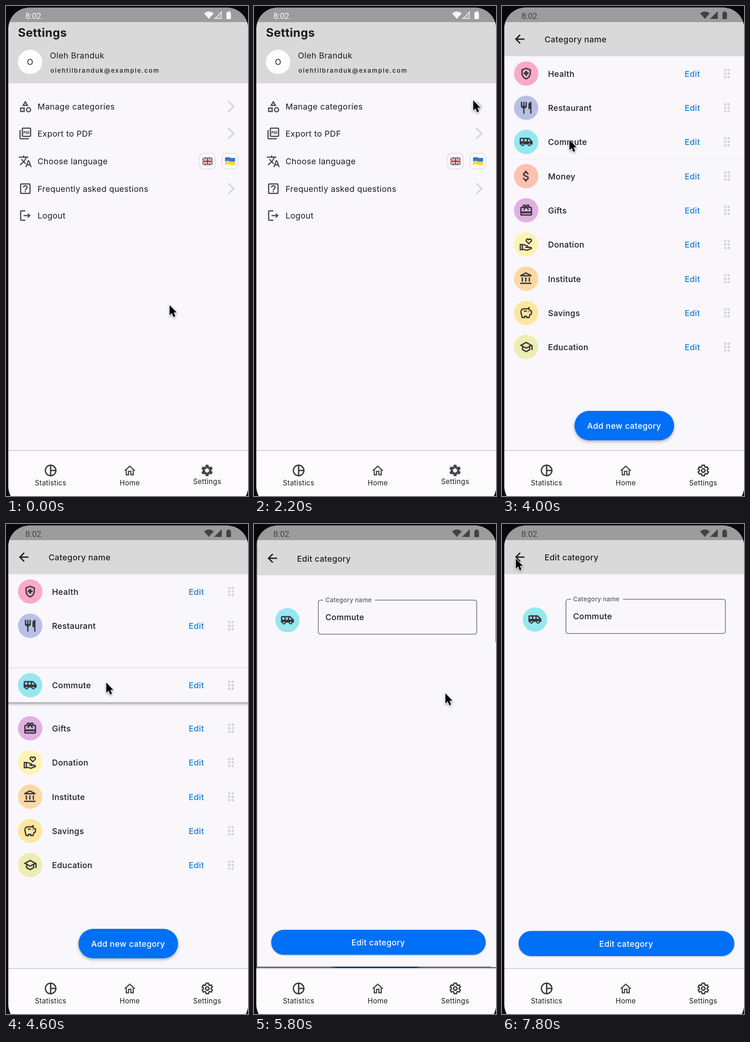
Animation of 526 by 1065 pixels, one loop 8000 ms. Source, as an HTML page:

```html
<!DOCTYPE html>
<html lang="en">
<head>
<meta charset="utf-8">
<title>Categories</title>
<style>
html, body { margin: 0; width: 526px; height: 1065px; overflow: hidden; background: #09070b; }
svg { display: block; }
text { font-family: Inter, sans-serif; font-size: 17.8px; letter-spacing: .38px; fill: #1c1b1f; }
.m { font-weight: 500; letter-spacing: .33px; }
.mid { text-anchor: middle; }
.title { font-size: 25.5px; font-weight: 700; letter-spacing: .35px; }
.mail { font-size: 13.3px; font-weight: 500; letter-spacing: 1.85px; }
.tab { font-size: 15.2px; letter-spacing: .3px; }
.label { font-size: 13.3px; font-weight: 500; letter-spacing: .28px; fill: #5c5a60; }
.clock { font-family: Roboto, sans-serif; font-size: 18px; letter-spacing: 0; fill: currentColor; }
.link { fill: #0f7fdf; }
.white { fill: #fff; }
.icon { fill: #49474c; fill-rule: evenodd; }
.dark { fill: #38363b; stroke: #38363b; stroke-width: .25; }
.back { fill: #1c1b1f; stroke: #1c1b1f; stroke-width: .2; }
.line { fill: none; stroke: #38363b; stroke-width: 2.1; }
.gear { fill: none; stroke: #38363b; stroke-width: 2.1; }
.chevron { fill: none; stroke: #d6d5d8; stroke-width: 3.4; }
.dots { fill: #d5d3d6; }
.button { fill: #0070f7; filter: drop-shadow(0 3px 3px rgba(0,0,0,.3)); }
.flat { filter: drop-shadow(0 1.5px 1.5px rgba(0,0,0,.3)); }
.pointer { stroke: #fff; stroke-width: 2.2; paint-order: stroke; filter: drop-shadow(0 2px 2px rgba(0,0,0,.35)); }

g, rect { transform-origin: 266px 484px; }
.cursor, .drag, .yield { transform-origin: 0 0; }
svg * { animation-duration: 8s; animation-iteration-count: infinite; animation-timing-function: linear; }

.cursor { animation-name: cursor; animation-timing-function: ease-in-out; }
@keyframes cursor {
  0% { transform: translate(355.5px, 650px); }
  15%, 35% { transform: translate(476.5px, 205px); }
  42.5%, 50% { transform: translate(146.5px, 291px); }
  62.5%, 63% { transform: translate(253px, 371px); }
  67.5%, 87.5% { transform: translate(416px, 368px); }
  97.5%, 100% { transform: translate(30px, 75px); }
}
.list-in { animation-name: list-in; }
@keyframes list-in {
  0%, 28.3% { opacity: 0; transform: scale(.87); }
  29% { opacity: 1; transform: scale(.94); }
  30.1% { transform: scale(.994); }
  31.9%, 100% { opacity: 1; transform: none; }
}
.edit-in { animation-name: edit-in; }
@keyframes edit-in {
  0%, 70.7% { opacity: 0; transform: scale(.87); }
  71.4% { opacity: 1; transform: scale(.94); }
  72.5% { transform: scale(.994); }
  74.2%, 100% { opacity: 1; transform: none; }
}
.settings-out { animation-name: settings-out; }
@keyframes settings-out {
  0%, 28.1% { transform: none; }
  30.1% { transform: scale(1.046); }
  31.9%, 100% { transform: scale(1.05); }
}
.list-out { animation-name: list-out; }
@keyframes list-out {
  0%, 70.5% { transform: none; }
  72.5% { transform: scale(1.046); }
  74.2%, 100% { transform: scale(1.05); }
}
.scrim-a { animation-name: scrim-a; }
@keyframes scrim-a { 0%, 28.1% { opacity: 0; } 30%, 100% { opacity: .6; } }
.scrim-b { animation-name: scrim-b; }
@keyframes scrim-b { 0%, 70.5% { opacity: 0; } 72.4%, 100% { opacity: .6; } }

.tab-on { animation-name: tab-on; }
@keyframes tab-on { 0%, 28.4% { opacity: 1; } 28.41%, 100% { opacity: 0; } }
.tab-off { animation-name: tab-off; }
@keyframes tab-off { 0%, 28.4% { opacity: 0; } 28.41%, 100% { opacity: 1; } }
.status { animation-name: status; fill: currentColor; }
@keyframes status { 0%, 37.4% { color: #f8f7f8; } 37.45%, 100% { color: #424144; } }
.signal { stroke: currentColor; stroke-width: 1.5; animation-name: signal; }
@keyframes signal { 0%, 37.4% { fill-opacity: .2; } 37.45%, 100% { fill-opacity: 1; } }

.drag { animation-name: drag; animation-timing-function: ease-in-out; }
@keyframes drag {
  0%, 50% { transform: none; }
  62.5% { transform: translateY(82px); }
  65.5%, 100% { transform: translateY(74.3px); }
}
.yield { animation-name: yield; animation-timing-function: ease-in-out; }
@keyframes yield {
  0%, 56.5% { transform: none; }
  59.5%, 100% { transform: translateY(-74.3px); }
}
.lift { animation-name: lift; }
@keyframes lift {
  0%, 49.9% { filter: drop-shadow(0 0 0 rgba(0,0,0,0)) drop-shadow(0 0 0 rgba(0,0,0,0)); }
  50% { filter: drop-shadow(0 .5px .5px rgba(0,0,0,.2)) drop-shadow(0 0 0 rgba(0,0,0,0)); }
  53%, 62.5% { filter: drop-shadow(0 .5px 1px rgba(0,0,0,.15)) drop-shadow(0 3px 3px rgba(0,0,0,.4)); }
  65.5%, 100% { filter: drop-shadow(0 0 0 rgba(0,0,0,0)) drop-shadow(0 0 0 rgba(0,0,0,0)); }
}
</style>
</head>
<body>
<svg id="stage" width="526" height="1065" viewBox="0 0 526 1065"></svg>
<script>
const ROW = 74.3, TOP = 109.7, BG = '#f9f7fb', HEAD = '#dad9da';

const icons = {
  shapes: 'M12 2l-5.5 9h11L12 2zm0 3.84L13.93 9h-3.87L12 5.84zM17.5 13a4.5 4.5 0 1 0 0 9 4.5 4.5 0 1 0 0-9zm0 2a2.5 2.5 0 1 1 0 5 2.5 2.5 0 1 1 0-5zM3 21.5h8v-8H3v8zm2-6h4v4H5v-4z',
  pdf: 'M20 2H8c-1.1 0-2 .9-2 2v12c0 1.1.9 2 2 2h12c1.1 0 2-.9 2-2V4c0-1.1-.9-2-2-2zm0 14H8V4h12v12zM4 6H2v14c0 1.1.9 2 2 2h14v-2H4V6zm12 6V9c0-.55-.45-1-1-1h-2v5h2c.55 0 1-.45 1-1zm-2-3h1v3h-1V9zm4 2h1v-1h-1V9h1V8h-2v5h1zm-8 0h1c.55 0 1-.45 1-1V9c0-.55-.45-1-1-1H9v5h1v-2zm0-2h1v1h-1V9z',
  translate: 'M12.87 15.07l-2.54-2.51.03-.03c1.74-1.94 2.98-4.17 3.71-6.53H17V4h-7V2H8v2H1v1.99h11.17C11.5 7.92 10.44 9.75 9 11.35 8.07 10.32 7.3 9.19 6.69 8h-2c.73 1.63 1.73 3.17 2.98 4.56l-5.09 5.02L4 19l5-5 3.11 3.11.76-2.04zM18.5 10h-2L12 22h2l1.12-3h4.75L21 22h2l-4.5-12zm-2.62 7l1.62-4.33L19.12 17h-3.24z',
  help: 'M5 3h14q2 0 2 2v14q0 2-2 2H5q-2 0-2-2V5q0-2 2-2zM5 5v14h14V5zM11 18h2v-2h-2v2zm1-12c-2.21 0-4 1.79-4 4h2c0-1.1.9-2 2-2s2 .9 2 2c0 2-3 1.75-3 5h2c0-2.25 3-2.5 3-5 0-2.21-1.79-4-4-4z',
  logout: 'M17 8l-1.41 1.41L17.17 11H9v2h8.17l-1.58 1.58L17 16l4-4-4-4zM5 5h7V3H5c-1.1 0-2 .9-2 2v14c0 1.1.9 2 2 2h7v-2H5V5z',
  pie: 'M12 2a10 10 0 1 0 0 20 10 10 0 1 0 0-20zm1 2.07c3.61.45 6.48 3.32 6.93 6.93H13V4.07zM4 12c0-4.06 3.07-7.44 7-7.93v15.87c-3.93-.5-7-3.88-7-7.94zm9 7.93V13h6.93c-.45 3.61-3.32 6.48-6.93 6.93z',
  home: 'M12 5.69l5 4.5V18h-2v-6H9v6H7v-7.81l5-4.5M12 3L2 12h3v8h6v-6h2v6h6v-8h3L12 3z',
  back: 'M20 11H7.83l5.59-5.59L12 4l-8 8 8 8 1.41-1.41L7.83 13H20v-2z',
  shield: 'M10.5 13H8v-3h2.5V7.5h3V10H16v3h-2.5v2.5h-3V13zM12 2L4 5v6.09c0 5.05 3.41 9.76 8 10.91 4.59-1.15 8-5.86 8-10.91V5l-8-3zm6 9.09c0 4-2.55 7.7-6 8.83-3.45-1.13-6-4.82-6-8.83v-4.7l6-2.25 6 2.25v4.7z',
  fork: 'M16 6v8h3v8h2V2c-2.76 0-5 2.24-5 4zm-5 3H9V2H7v7H5V2H3v7c0 2.21 1.79 4 4 4v9h2v-9c2.21 0 4-1.79 4-4V2h-2v7z',
  bus: 'M17 5H3c-1.1 0-2 .89-2 2v9h2a3 3 0 0 0 6 0h5.5a3 3 0 0 0 6 0H23v-5l-6-6zM3 11V7h4v4H3zm3 6.5a1.5 1.5 0 1 1 0-3 1.5 1.5 0 1 1 0 3zm7-6.5H9V7h4v4zm4.5 6.5a1.5 1.5 0 1 1 0-3 1.5 1.5 0 1 1 0 3zM15 11V7h1l4 4h-5z',
  dollar: 'M11.8 10.9c-2.27-.59-3-1.2-3-2.15 0-1.09 1.01-1.85 2.7-1.85 1.78 0 2.44.85 2.5 2.1h2.21c-.07-1.72-1.12-3.3-3.21-3.81V3h-3v2.16c-1.94.42-3.5 1.68-3.5 3.61 0 2.31 1.91 3.46 4.7 4.13 2.5.6 3 1.48 3 2.41 0 .69-.49 1.79-2.7 1.79-2.06 0-2.87-.92-2.98-2.1h-2.2c.12 2.19 1.76 3.42 3.68 3.83V21h3v-2.15c1.95-.37 3.5-1.5 3.5-3.55 0-2.84-2.43-3.81-4.7-4.4z',
  gift: 'M20 6h-2.18A3 3 0 0 0 12.5 3.35l-.5.67-.5-.68A3 3 0 0 0 6.18 6H4q-2 0-2 2v11q0 2 2 2h16q2 0 2-2V8q0-2-2-2zm-5-2a1 1 0 1 1 0 2 1 1 0 1 1 0-2zM9 4a1 1 0 1 1 0 2 1 1 0 1 1 0-2zm11 15H4v-2h16v2zm0-5H4V8h5.08L7 10.83 8.62 12 12 7.4 15.38 12 17 10.83 14.92 8H20v6z',
  hand: 'M2 12h3.5v9H2zM5.5 12.5h3.3l5.4 2.1q1.2.9 0 2.4h-3.7M5.5 19.8l8 2.1 7.5-3q0-1.9-2-1.9h-5M16.5 10.6l-4.2-4.2a2.4 2.4 0 0 1 4.2-2.6 2.4 2.4 0 0 1 4.2 2.6z',
  bank: 'M6.5 10h-2v7h2v-7zm6 0h-2v7h2v-7zm8.5 9H2v2h19v-2zm-2.5-9h-2v7h2v-7zm-7-6.74L16.71 6H6.29l5.21-2.74m0-2.26L2 6v2h19V6l-9.5-5z',
  pig: 'M14.8 5H8.5Q3 5 3 10.5 3.5 14 5.3 20H9v-2h4v2h4l1.5-5.2L21 14V8.5h-1.5L16.6 5.6l.6-2.3Q15.5 3.6 14.8 5zM8 9h5M16 9.5v1',
  cap: 'M12 3L1 9l4 2.18v6L12 21l7-3.82v-6l2-1.09V17h2V9L12 3zm6.82 6L12 12.72 5.18 9 12 5.28 18.82 9zM17 15.99l-5 2.73-5-2.73v-3.72L12 15l5-2.73v3.72z'
};

const categories = [
  ['Health', 'shield', '#fbaac6'], ['Restaurant', 'fork', '#b9c0e6'], ['Commute', 'bus', '#95e8f0'],
  ['Money', 'dollar', '#fcc1b0'], ['Gifts', 'gift', '#e1b0e2'], ['Donation', 'hand', '#fdf3b2'],
  ['Institute', 'bank', '#fcd8a3'], ['Savings', 'pig', '#fde6a0'], ['Education', 'cap', '#ededb2']
];

const rect = (x, y, w, h, fill, more = '') =>
  `<rect x="${x}" y="${y}" width="${w}" height="${h}" fill="${fill}" ${more}/>`;
const disc = (x, y, fill) => `<circle cx="${x}" cy="${y}" r="26.5" fill="${fill}"/>`;
const at = (x, y, d, cls = 'icon') =>
  `<path class="${cls}" transform="translate(${x - 15.24} ${y - 15.24}) scale(1.27)" d="${d}"/>`;
const icon = (x, y, name, cls) => at(x, y, icons[name], cls);
// y is the middle of the capitals
const text = (x, y, str, cls = '', size = 17.8) =>
  `<text x="${x}" y="${y + size * .364}" class="${cls}">${str}</text>`;
const ring = r => `M${12 - r} 12a${r} ${r} 0 1 0 ${2 * r} 0a${r} ${r} 0 1 0 ${-2 * r} 0z`;

function gear(k, hole) {
  const corners = [[7.5, -22.5], [10.2, -13], [10.2, 13], [7.5, 22.5]];
  const pts = [];
  for (let tooth = 0; tooth < 6; tooth++)
    for (const [r, deg] of corners) {
      const a = (tooth * 60 - 90 + deg) * Math.PI / 180;
      pts.push([12 + k * r * Math.cos(a), 12 + k * r * Math.sin(a)].map(n => n.toFixed(2)));
    }
  return `M${pts.join('L')}z${ring(hole)}`;
}

const chevron = y => `<path class="chevron" d="M483 ${y - 11.5}l12 11.5l-12 11.5"/>`;
const flagBox = x => rect(x, 320, 34.5, 34, '#fbfafc', 'rx="9" stroke="#dcdbde" stroke-width="1.5"');
const header = title => rect(0, 0, 526, TOP - .5, HEAD) + icon(38.5, 72, 'back', 'back') + text(92.5, 73, title, 'm');

function badge(x, y, name, fill) {
  const stroked = name === 'hand' || name === 'pig';
  return disc(x, y, fill) + icon(x, y, name, stroked ? 'line' : 'icon dark');
}

function row([label, name, fill], i) {
  const y = ROW / 2;
  const moving = { Commute: 'drag', Money: 'yield' }[label] || '';
  const dots = [-7.6, 0, 7.6].flatMap(dy => [485.2, 492.8].map(x =>
    `<circle cx="${x}" cy="${y + dy}" r="2.7"/>`)).join('');
  return `<g transform="translate(0 ${TOP + i * ROW})"><g class="${moving}">
    ${moving === 'drag' ? rect(-20, 0, 566, ROW, BG, 'class="lift"') : ''}
    ${badge(52.5, y, name, fill)}${text(100, y + .5, label, 'm')}${text(397, y + .5, 'Edit', 'm link')}
    <g class="dots">${dots}</g></g></g>`;
}

const ukFlag = `<svg x="427" y="329" width="22" height="17" viewBox="0 0 22 17">
  ${rect(0, 0, 22, 17, '#26417f', 'rx="1"')}
  <path d="M0 0l22 17M22 0L0 17" stroke="#fff" stroke-width="3.4"/>
  <path d="M0 0l22 17M22 0L0 17" stroke="#d0253a" stroke-width="1.2"/>
  <path d="M11 0v17M0 8.5h22" stroke="#fff" stroke-width="5.4"/>
  <path d="M11 0v17M0 8.5h22" stroke="#d0253a" stroke-width="3"/></svg>`;
const wave = (y, h, fill) => `<path fill="${fill}" d="M476 ${y}q5.5-2 11 0t11 0v${h}q-5.5 2-11 0t-11 0z"/>`;
const uaFlag = wave(329.5, 16, '#ffd93b') + wave(329.5, 8, '#2e7bd0');

const settings = rect(0, 0, 526, 970, BG) + rect(0, 0, 526, 168, HEAD) +
  text(26, 57.5, 'Settings', 'title', 25.5) + disc(52.5, 121.5, '#fdfbfe') +
  text(52.5, 121.5, 'O', 'mid') + text(95.5, 108, 'Oleh Branduk') +
  text(96.5, 140, 'olehtilbranduk@example.com', 'mail', 13.3) +
  [['shapes', 219, 'Manage categories'], ['pdf', 277.5, 'Export to PDF'], ['translate', 338, 'Choose language'],
   ['help', 397.5, 'Frequently asked questions'], ['logout', 456, 'Logout']]
    .map(([name, y, label]) => icon(42, y - .5, name) + text(68.5, y, label)).join('') +
  [218.5, 277, 397].map(chevron).join('') + flagBox(420.5) + flagBox(469.5) + ukFlag + uaFlag;

// the dragged row is painted last, above the others
const order = [...categories.keys()].sort((a, b) => (a === 2) - (b === 2));
const list = rect(0, 0, 526, 970, BG) + order.map(i => row(categories[i], i)).join('') + header('Category name') +
  rect(157.5, 880, 216.5, 64, '', 'rx="32" class="button"') + text(265.5, 912.5, 'Add new category', 'm white mid');

const edit = `<g clip-path="url(#page)">${rect(0, 0, 530, 965, BG)}${header('Edit category')}</g>` +
  rect(139, 163.5, 346.5, 74.5, 'none', 'rx="5" stroke="#6d6a70" stroke-width="1.5"') +
  rect(150, 161, 113, 5, BG) + text(154.5, 163, 'Category name', 'label', 13.3) +
  text(154.5, 200.5, 'Commute', 'm') + badge(71.5, 207.5, 'bus', '#95e8f0') +
  rect(36, 884.5, 469, 54.5, '', 'rx="27.2" class="button flat"') + text(270, 912.5, 'Edit category', 'm white mid');

const nav = rect(0, 965, 526, 100, '#fdfbfe') + rect(0, 965, 526, 2.5, '#d8d7d9') +
  icon(97, 1009.5, 'pie', 'icon dark') + text(97, 1036, 'Statistics', 'tab mid', 15.2) +
  icon(269, 1010, 'home') + text(269, 1036, 'Home', 'tab mid', 15.2) +
  `<g class="tab-on">${at(437, 1009.5, gear(1, 3.5))}${text(437.3, 1033.5, 'Settings', 'tab mid', 15.2)}</g>
   <g class="tab-off">${at(437.5, 1009.5, gear(.9, 3), 'gear')}${text(437.3, 1036, 'Settings', 'tab mid', 15.2)}</g>`;

const status = rect(0, 0, 526, 35, '#000', 'fill-opacity=".28"') + `<g class="status">
  ${text(42, 21, '8:02', 'clock', 18)}
  <path d="M441 28L430.5 16Q441 8 451.5 16z"/>
  <path class="signal" d="M454 27.2H468.2V13z"/>
  <path d="M479.5 14.5h2.7v-2.5h3.6v2.5h2.7v13.5h-9z" stroke="currentColor"/></g>`;

const scrim = id => rect(0, 0, 526, 970, '#000', `class="scrim-${id}"`);

document.getElementById('stage').innerHTML = `
  <defs>
    <clipPath id="screen"><rect x="5" y="3.5" width="521.5" height="1086.5" rx="46"/></clipPath>
    <clipPath id="page"><rect x="5" y="0" width="521.5" height="965"/></clipPath>
  </defs>
  <g clip-path="url(#screen)">
    <g class="settings-out">${settings}</g>${scrim('a')}
    <g class="list-in"><g class="list-out">${list}</g></g>${scrim('b')}
    <g class="edit-in">${edit}</g>
    ${nav}${status}
  </g>
  <g class="cursor"><path class="pointer" d="M0 0V22L5 17.5L8.5 26L12.5 24.3L9 16H15.5z"/></g>`;
</script>
</body>
</html>
```
